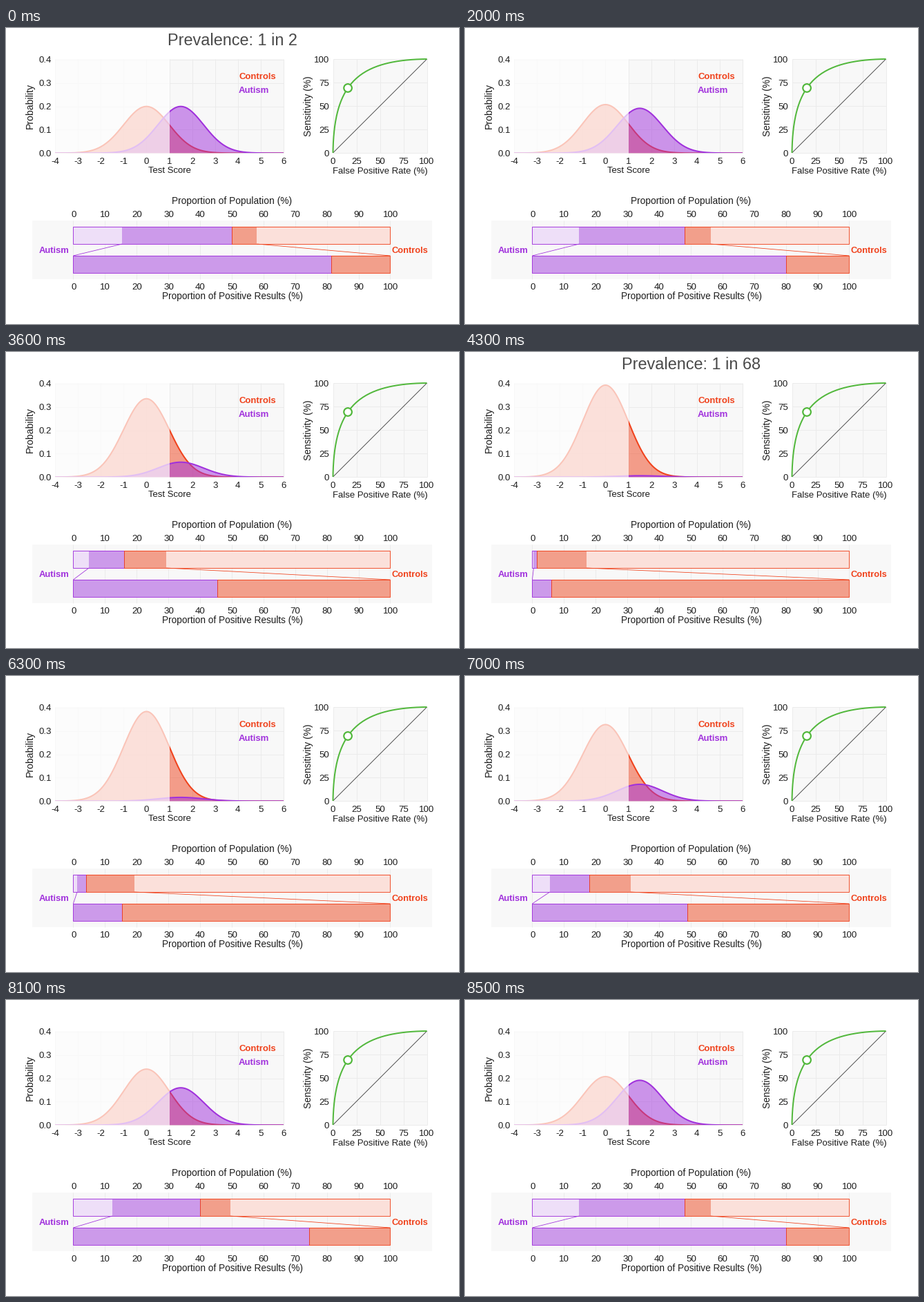
Write a matplotlib script that moves like this. It is 656 px wide and 429 px high and loops after 8600 ms.

```python
import math

import matplotlib.pyplot as plt
import numpy as np
from matplotlib.animation import FuncAnimation
from matplotlib.patches import Circle, Polygon, Rectangle

W, H, DPI = 656, 429, 100
PX = 72 / DPI  # points per pixel

RED, PURPLE, GREEN = "#f0421c", "#a030dc", "#52b83c"
INK, PANEL, GRID = "#1c1c1c", "#f8f8f8", "#ebebeb"
RED_MID, RED_PALE = "#f29f8b", "#fbe0da"
PURPLE_MID, PURPLE_PALE = "#cc9aea", "#eedff8"

SHIFT, CUT = 1.5, 1.0
HOLD, MOVE = 20, 23
FRAMES = 2 * (HOLD + MOVE)

fig = plt.figure(figsize=(W / DPI, H / DPI), dpi=DPI, facecolor="white")
ax = fig.add_axes([0, 0, 1, 1])
ax.set_xlim(0, W)
ax.set_ylim(H, 0)
ax.axis("off")


def label(x, y, s, size=13.3, ha="center", color=INK, **kw):
    return ax.text(x, y, s, ha=ha, color=color, fontsize=size * PX,
                   family="Liberation Sans", **{"va": "baseline", **kw})


def line(xs, ys, color, width=1.0, z=2):
    return ax.plot(xs, ys, color=color, lw=width * PX, zorder=z,
                   solid_joinstyle="miter", solid_capstyle="butt")[0]


def box(x0, y0, x1, y1, color, z=1, **kw):
    return ax.add_patch(Rectangle((x0, y0), x1 - x0, y1 - y0, fc=color,
                                  lw=0, zorder=z, **kw))


def span(rect, x0, x1):
    rect.set_x(x0)
    rect.set_width(x1 - x0)


def upper_tail(z):
    return 0.5 * math.erfc(z / math.sqrt(2))


def density(x):
    return np.exp(-x * x / 2) / math.sqrt(2 * math.pi)


def score_x(v):
    return 71 + (v + 4) * 33.1


def prob_y(v):
    return 181.3 - v * 339


def rate_x(v):
    return 473.5 + v * 136


def rate_y(v):
    return 181 - v * 136


def share_x(v):
    return 97.4 + v * 459


# Score distributions
plot = box(71, 45, 402, 181.3, PANEL)
for v in range(-4, 7):
    line([score_x(v)] * 2, [45, 181], GRID)
    label(score_x(v), 197, str(v))
for i in range(5):
    line([71, 402], [prob_y(i / 10)] * 2, GRID)
    label(66, prob_y(i / 10) + 4.5, f"{i / 10:.1f}", ha="right")
label(236.5, 210.5, "Test Score", 13.1)
label(34.8, 113, "Probability", 14, rotation=90, va="center")
label(337, 74.5, "Controls", 13.1, "left", RED, weight="bold")
label(337, 94.5, "Autism", 13.1, "left", PURPLE, weight="bold")

scores = np.linspace(-4, 6, 301)
sx = score_x(scores)


def hump(color, z):
    fill = ax.add_patch(Polygon([[0, 0], [1, 1]], fc=color, alpha=0.5,
                                lw=0, zorder=z))
    edge = line(sx, sx, color, 2, z + 0.1)
    edge.set_clip_path(plot)
    return fill, edge


control_hump = hump(RED, 3)
autism_hump = hump(PURPLE, 4)
box(70, 43, score_x(CUT), 183, "white", 5, alpha=0.69)


def set_hump(parts, weight, mean):
    fill, edge = parts
    y = prob_y(weight * density(scores - mean))
    edge.set_ydata(y)
    outline = np.column_stack([sx, y])
    fill.set_xy(np.vstack([outline, [402, prob_y(0)], [71, prob_y(0)]]))


# ROC curve
box(473.5, 45, 609.5, 181, PANEL)
for i in range(5):
    v = i / 4
    line([rate_x(v)] * 2, [45, 181], GRID)
    line([473.5, 609.5], [rate_y(v)] * 2, GRID)
    label(rate_x(v), 197, str(25 * i))
    label(468, rate_y(v) + 4.5, str(25 * i), ha="right")
label(541.5, 210.5, "False Positive Rate (%)", 13.1)
label(438.3, 113, "Sensitivity (%)", 13.8, rotation=90, va="center")
line([473.5, 609.5], [181, 45], "#222222", 0.75, 3)
cuts = np.linspace(-5, 7, 240)
line([rate_x(upper_tail(c)) for c in cuts],
     [rate_y(upper_tail(c - SHIFT)) for c in cuts], GREEN, 2, 4)
FALSE_POS, SENS = upper_tail(CUT), upper_tail(CUT - SHIFT)
ax.add_patch(Circle((rate_x(FALSE_POS), rate_y(SENS)), 5.8, fc="white",
                    ec=GREEN, lw=2.2 * PX, zorder=5))

# Proportion bars
LEFT, RIGHT = share_x(0), share_x(1)
box(38, 279, 617, 364, PANEL)
for i in range(11):
    x = share_x(i / 10)
    line([x, x], [279, 364], GRID)
    label(x + 0.5, 274, str(10 * i), 13.4)
    label(x + 0.5, 379, str(10 * i), 13.4)
label(327, 255.5, "Proportion of Population (%)", 13.7)
label(327.5, 393, "Proportion of Positive Results (%)", 13.6)
label(91.5, 326, "Autism", 13, "right", PURPLE, weight="bold")
label(558.8, 326, "Controls", 12.9, "left", RED, weight="bold")

TOP, LOW = (288, 313), (330, 355)
top_parts = [box(LEFT, TOP[0], RIGHT, TOP[1], c, 3)
             for c in (PURPLE_PALE, PURPLE_MID, RED_MID, RED_PALE)]
low_parts = [box(LEFT, LOW[0], RIGHT, LOW[1], c, 3)
             for c in (PURPLE_MID, RED_MID)]


def frames_for(rows):
    pair = []
    for color in (PURPLE, RED):
        r = box(LEFT, rows[0], RIGHT, rows[1], "none", 4)
        r.set(edgecolor=color, linewidth=0.9 * PX)
        pair.append(r)
    return pair


top_frames, low_frames = frames_for(TOP), frames_for(LOW)
left_link = line([LEFT, LEFT], [TOP[1], LOW[0]], PURPLE, 0.8, 4)
right_link = line([RIGHT, RIGHT], [TOP[1], LOW[0]], RED, 0.8, 4)

title = label(327.5, 25, "", 23.5, color="#4a4a4a")


def state(i):
    """Prevalence and title for a frame."""
    if i < HOLD:
        return 1 / 2, "Prevalence: 1 in 2"
    if i < HOLD + MOVE:
        return 0.48 - 0.02 * (i - HOLD), ""
    if i < 2 * HOLD + MOVE:
        return 1 / 68, "Prevalence: 1 in 68"
    return 0.04 + 0.02 * (i - 2 * HOLD - MOVE), ""


def update(i):
    p, text = state(i)
    title.set_text(text)
    set_hump(control_hump, 1 - p, 0)
    set_hump(autism_hump, p, SHIFT)

    hits, alarms = p * SENS, (1 - p) * FALSE_POS
    edges = [share_x(v) for v in (0, p - hits, p, p + alarms, 1)]
    for part, a, b in zip(top_parts, edges, edges[1:]):
        span(part, a, b)
    split = share_x(hits / (hits + alarms))
    for parts, mid in ((top_frames, edges[2]), (low_frames, split),
                       (low_parts, split)):
        span(parts[0], LEFT, mid)
        span(parts[1], mid, RIGHT)
    left_link.set_xdata([edges[1], LEFT])
    right_link.set_xdata([edges[3], RIGHT])
    return []


anim = FuncAnimation(fig, update, frames=FRAMES, interval=100,
                     repeat=True, repeat_delay=0, blit=False)
plt.show()
```
